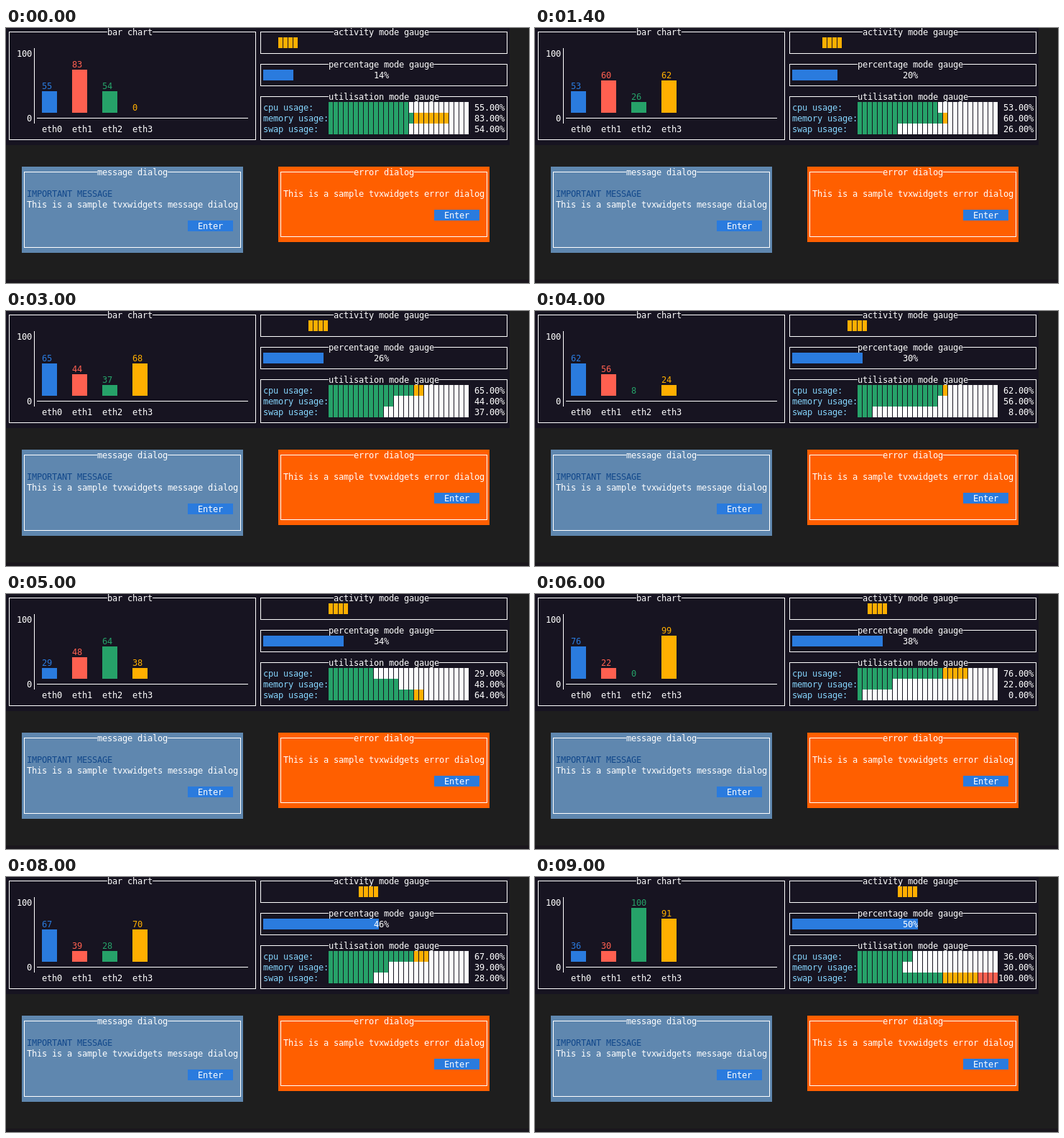
An HTML page with a canvas for the animation above (9.2 s loop, 728 by 355 pixels).

```html
<!DOCTYPE html>
<html lang="en">
<head>
<meta charset="utf-8">
<title>Terminal widgets</title>
<style>
  html, body { margin: 0; width: 100%; height: 100%; overflow: hidden; background: #1e1e1e; }
  canvas { display: block; }
</style>
</head>
<body>
<canvas id="screen" width="728" height="355"></canvas>
<script>
const ctx = document.getElementById('screen').getContext('2d');
const CW = 7, CH = 15, LOOP = 9200;
const PANEL = '#171421', WHITE = '#ffffff', BLUE = '#2a7bde', RED = '#ff6050',
      GREEN = '#26a269', AMBER = '#ffaf00', SKY = '#87d7ff', NAVY = '#12488b',
      STEEL = '#5f87af', ORANGE = '#ff5f00';
const BAR_COLORS = [BLUE, RED, GREEN, AMBER];

// eth0..eth3 per tick; the first three also feed the utilisation gauge
const TICKS = [
  [55, 83, 54, 0], [38, 47, 71, 34], [57, 72, 43, 51], [53, 60, 26, 62],
  [74, 35, 58, 27], [21, 100, 91, 49], [65, 44, 37, 68], [68, 71, 37, 45],
  [62, 56, 8, 24], [41, 67, 52, 73], [29, 48, 64, 38], [47, 63, 31, 56],
  [76, 22, 0, 99], [58, 41, 46, 61], [92, 26, 18, 15], [44, 65, 57, 42],
  [67, 39, 28, 70], [51, 54, 73, 47], [36, 30, 100, 91]
];

const px = col => 1 + col * CW;
const py = row => -2 + row * CH;

function rect(x, y, w, h, color) {
  ctx.fillStyle = color;
  ctx.fillRect(x, y, w, h);
}

function cells(col, row, w, h, color) {
  rect(px(col), py(row), w * CW, h * CH, color);
}

function text(str, col, row, color = WHITE) {
  ctx.fillStyle = color;
  [...str].forEach((ch, i) => ctx.fillText(ch, px(col + i), py(row) + 12));
}

function block(col, row, color) {
  rect(px(col), py(row), CW - 1, CH, color);
}

function box(col, row, w, h, title, titleCol, bg) {
  cells(col, row, w, h, bg);
  const x = px(col) + 3, y = py(row) + 7;
  const bw = (w - 1) * CW, bh = (h - 1) * CH;
  ctx.strokeStyle = WHITE;
  ctx.lineWidth = 1;
  ctx.strokeRect(x + 0.5, y + 0.5, bw, bh);
  cells(titleCol, row, title.length, 1, bg);
  text(title, titleCol, row);
}

function button(col, row) {
  cells(col, row, 9, 1, BLUE);
  text('Enter', col + 2, row);
}

function barChart(values) {
  box(0, 0, 50, 11, 'bar chart', 20, PANEL);
  rect(39, 28, 1, 105, WHITE);
  rect(43, 125, 294, 1, WHITE);
  text('100', 2, 2);
  text('0', 4, 8);
  values.forEach((v, i) => {
    const col = 7 + 6 * i, h = Math.floor(v / 20);
    cells(col, 8 - h, 3, h, BAR_COLORS[i]);
    text(String(v), col, 7 - h, BAR_COLORS[i]);
    text('eth' + i, col, 9);
  });
}

function activityGauge(tick) {
  box(50, 0, 50, 3, 'activity mode gauge', 65, PANEL);
  for (let i = 0; i < 4; i++) block(54 + tick + i, 1, AMBER);
}

function percentGauge(pc) {
  box(50, 3, 50, 3, 'percentage mode gauge', 64, PANEL);
  const n = Math.floor(pc * 48 / 100);
  cells(51, 4, n >= 22 ? Math.min(n + 1, 25) : n, 1, BLUE);
  text(pc + '%', 73, 4);
}

function usageGauge(values) {
  box(50, 6, 50, 5, 'utilisation mode gauge', 64, PANEL);
  ['cpu', 'memory', 'swap'].forEach((name, i) => {
    const row = 7 + i, v = values[i];
    text(name + ' usage:', 51, row, SKY);
    for (let j = 0; j < 28; j++) {
      const level = Math.floor(j * 100 / 28);
      const color = level > v ? WHITE : level < 60 ? GREEN : level < 85 ? AMBER : RED;
      block(64 + j, row, color);
    }
    const label = v.toFixed(2) + '%';
    text(label, 99 - label.length, row);
  });
}

function dialogs() {
  box(3, 13, 44, 8, 'message dialog', 18, STEEL);
  text('IMPORTANT MESSAGE', 4, 15, NAVY);
  text('This is a sample tvxwidgets message dialog', 4, 16);
  button(36, 18);
  box(54, 13, 42, 7, 'error dialog', 69, ORANGE);
  text('This is a sample tvxwidgets error dialog', 55, 15);
  button(85, 17);
}

function tickAt(t) {
  if (t < 400) return 0;
  if (t < 3000) return Math.min(5, 1 + Math.floor((t - 400) / 500));
  return 6 + Math.floor((t - 3000) / 500);
}

function draw(tick) {
  const values = TICKS[tick];
  ctx.font = '12px "DejaVu Sans Mono", monospace';
  rect(0, 0, 728, 355, '#1e1e1e');
  rect(0, 350, 728, 5, '#1a171d');
  rect(0, 0, 701, 163, PANEL);
  barChart(values);
  activityGauge(tick);
  percentGauge(14 + 2 * tick);
  usageGauge(values);
  dialogs();
}

const start = performance.now();
function frame() {
  draw(tickAt((performance.now() - start) % LOOP));
  requestAnimationFrame(frame);
}
frame();
</script>
</body>
</html>
```
